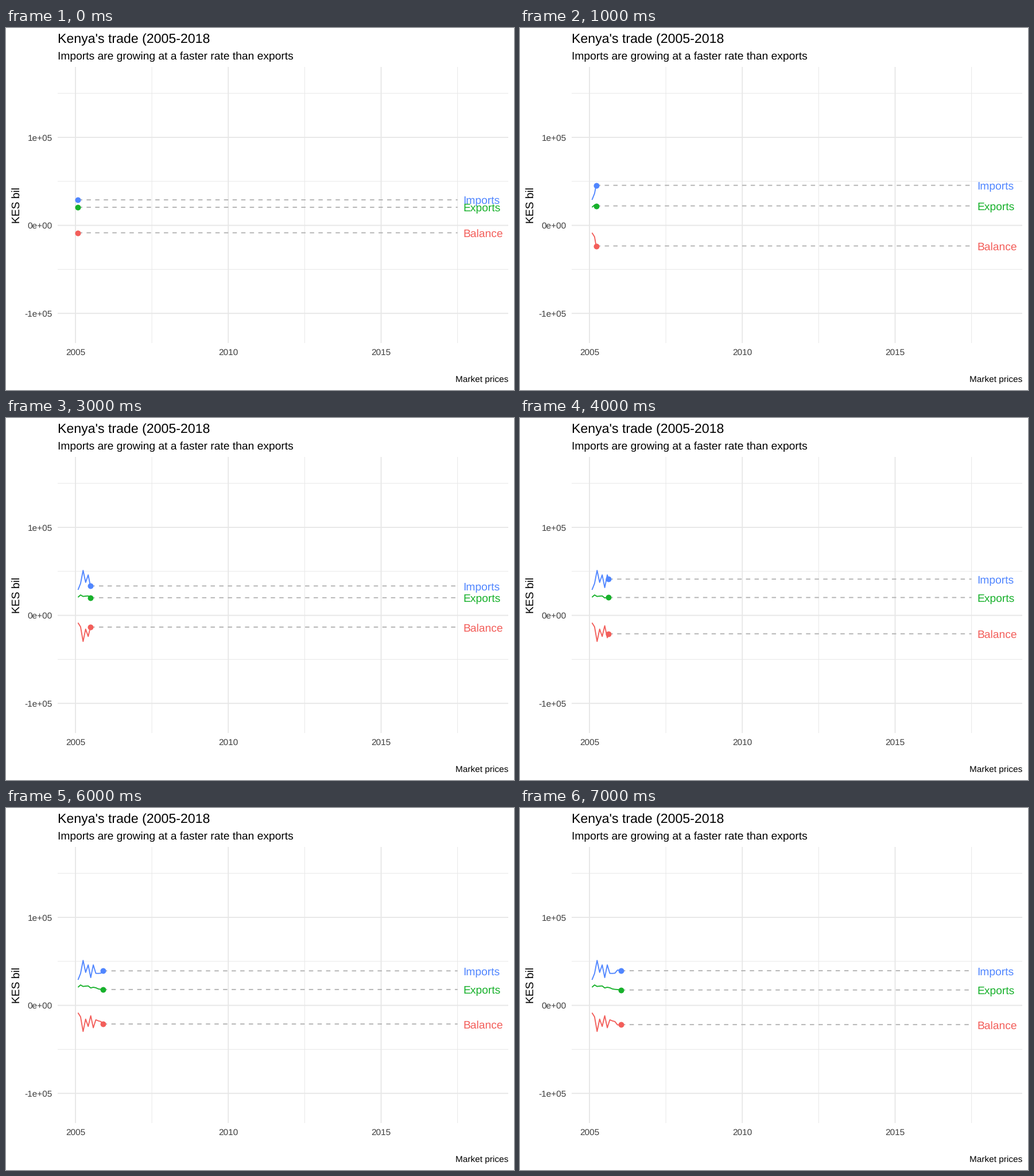
Animation of 885 by 632 pixels, one loop 8000 ms. Source, as a matplotlib script:

```python
import matplotlib.pyplot as plt
import numpy as np
from matplotlib.animation import FuncAnimation

W, H, DPI = 885, 632, 100
PT = 72 / DPI                      # points per pixel
BASE, SMALL, TITLE = 19.3, 15.45, 23.15
LINE = 1.87
LEFT, RIGHT, TOP, BOTTOM = 90, 875, 68, 550
GRID, DASH, TICK = "#e7e7e7", "#b2b2b2", "#3d3d3d"
FRAMES, STEP = 8, 0.1354           # years revealed per frame

plt.rcParams["font.family"] = "Liberation Sans"
plt.rcParams["text.hinting"] = "none"


def px(year):
    return 121 + 53.25 * (year - 2005)


def py(value):
    """Value in thousands to pixels from the top."""
    return 344.6 - 1.5365 * value


# Monthly values in thousands, from January 2005
imports = np.array([29.0, 36.2, 51.1, 37.5, 46.0, 31.6, 46.0,
                    36.4, 36.3, 36.6, 40.1, 39.9, 38.5])
exports = np.array([20.6, 23.2, 21.5, 21.9, 22.1, 19.8, 20.6,
                    20.0, 18.7, 18.2, 18.0, 17.6, 17.4])
months = 2005 + np.arange(1, len(imports) + 1) / 12
series = {
    "Balance": (exports - imports, "#f35e5a"),
    "Imports": (imports, "#5086ff"),
    "Exports": (exports, "#17b12b"),
}

fig = plt.figure(figsize=(W / DPI, H / DPI), dpi=DPI, facecolor="white")
ax = fig.add_axes([0, 0, 1, 1])
ax.set_xlim(0, W)
ax.set_ylim(H, 0)
ax.axis("off")


def stroke(xs, ys, color, width=LINE, **kw):
    return ax.plot(xs, ys, color=color, lw=width * PT, snap=False, **kw)[0]


def label(x, y, text, size, color="black", ha="left", **kw):
    return ax.text(x, y, text, fontsize=size * PT, color=color, ha=ha,
                   va="baseline", **kw)


def draw_grid():
    for width, years, values in (
        (LINE / 2, (2007.5, 2012.5, 2017.5), (150, 50, -50)),
        (LINE, (2005, 2010, 2015), (100, 0, -100)),
    ):
        for v in values:
            stroke([LEFT, RIGHT], [py(v)] * 2, GRID, width,
                   solid_capstyle="butt", zorder=1)
        for yr in years:
            stroke([px(yr)] * 2, [TOP, BOTTOM], GRID, width,
                   solid_capstyle="butt", zorder=1)


def draw_text():
    label(LEFT, 26.5, "Kenya's trade (2005-2018", TITLE)
    label(LEFT, 54.8, "Imports are growing at a faster rate than exports", BASE)
    label(RIGHT, 618.3, "Market prices", SMALL, ha="right")
    label(23.5, 309, "KES bil", BASE, ha="center", rotation=90,
          rotation_mode="anchor")
    for yr in (2005, 2010, 2015):
        label(px(yr), 570.5, str(yr), SMALL, TICK, ha="center")
    for v, name in ((100, "1e+05"), (0, "0e+00"), (-100, "-1e+05")):
        label(81, py(v) + 5.6, name, SMALL, TICK, ha="right")


draw_grid()
draw_text()

parts = []
for name, (values, color) in series.items():
    guide = stroke([], [], DASH, linestyle=(0, (4, 4)), zorder=2)
    trail = stroke([], [], color, solid_capstyle="butt",
                   solid_joinstyle="round", zorder=3)
    dot = ax.plot([], [], "o", color=color, ms=10 * PT, mew=0, zorder=4,
                  snap=False)[0]
    tag = label(796, 0, name, BASE, color, zorder=5)
    parts.append((values, guide, trail, dot, tag))


def update(frame):
    now = months[0] + STEP * frame
    past = months < now
    x = px(now)
    for values, guide, trail, dot, tag in parts:
        y = py(np.interp(now, months, values))
        guide.set_data([x, px(2017.5)], [y, y])
        trail.set_data(np.append(px(months[past]), x),
                       np.append(py(values[past]), y))
        dot.set_data([x], [y])
        tag.set_y(y + 7.5)
    return [artist for part in parts for artist in part[1:]]


anim = FuncAnimation(fig, update, frames=FRAMES, interval=1000, repeat=True,
                     repeat_delay=0, blit=False)
plt.show()
```
